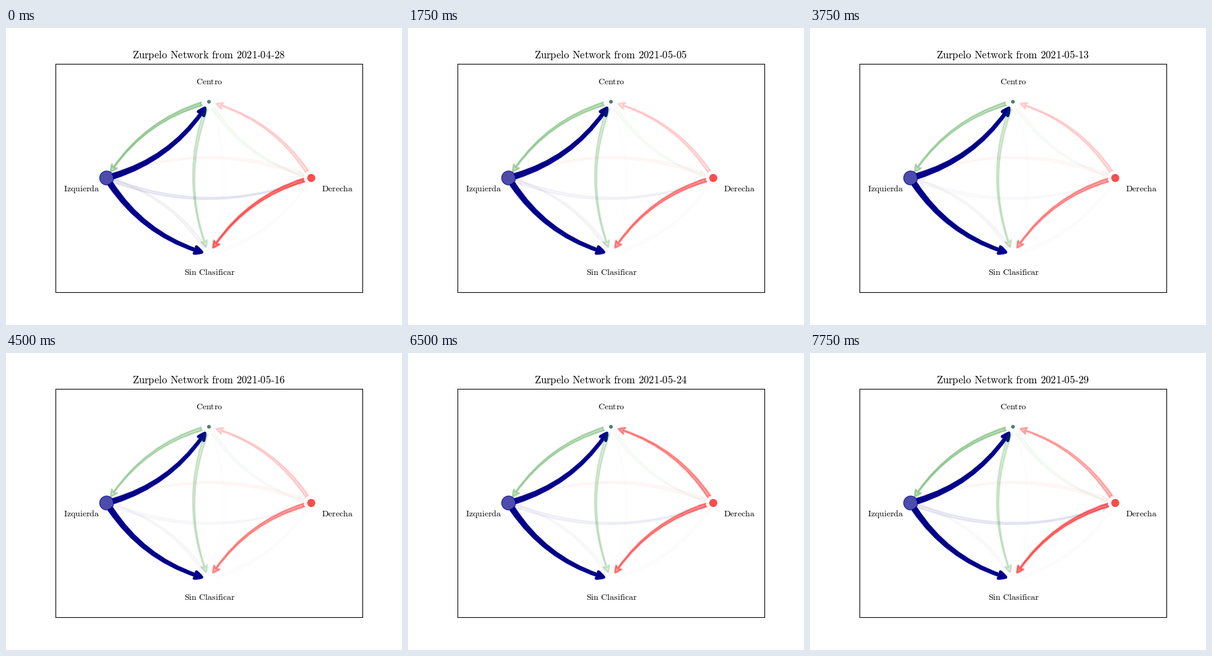
A matplotlib script that plays this animation: 640 px wide and 480 px high, repeating every 8000 ms.

```python
import numpy as np
import matplotlib.pyplot as plt
from matplotlib.animation import FuncAnimation
from matplotlib.patches import FancyArrowPatch, Rectangle

plt.rcParams["mathtext.fontset"] = "cm"

W, H, DPI = 640, 480, 100
DAYS = 32
EM = 12 * DPI / 72          # title size in pixels
GAP = r"\hspace{0.38}"      # one third of an em
TITLE_LEFT, TITLE_RIGHT, TITLE_Y = 204.1, 450.9, 430.7

NODES = {"I": (-1, 0), "C": (0, 1), "D": (1, 0), "S": (0, -1)}
COLORS = {"I": "darkblue", "C": "green", "D": "red", "S": "#6e5078"}
LABELS = [
    (-1.25, -0.15, "Izquierda"),
    (0, 1.25, "Centro"),
    (1.25, -0.15, "Derecha"),
    (0, -1.25, "Sin Clasificar"),
]


def roman(words):
    return r"$\mathrm{" + words.replace(" ", GAP) + "}$"


def day_title(day):
    month, date = (4, 28 + day) if day < 3 else (5, day - 2)
    return roman(f"Zurpelo Network from 2021 {month:02d} {date:02d}")


def bump(day, center, width):
    return np.exp(-((day - center) / width) ** 2 / 2)


def weights(day):
    """Strength of each edge, named by its start and end node."""
    t = day / (DAYS - 1)
    mid = np.sin(np.pi * t)
    lull = bump(day, 22, 2)
    return {
        "IC": 1 - 0.3 * lull,
        "ID": 0.065 - 0.048 * mid,
        "IS": 1,
        "CI": 0.28 - 0.04 * mid - 0.1 * lull,
        "CD": 0.03 - 0.012 * mid,
        "CS": 0.15,
        "DI": 0.025 - 0.015 * lull,
        "DC": 0.13 + 0.23 * bump(day, 27, 3.5),
        "DS": 0.47 - 0.13 * mid,
        "SI": 0.05 - 0.03 * t,
        "SC": 0.004,
        "SD": 0.006,
    }


fig = plt.figure(figsize=(W / DPI, H / DPI), dpi=DPI, facecolor="white")
ax = fig.add_axes([0.125, 0.11, 0.775, 0.77])
ax.set(xlim=(-1.5, 1.5), ylim=(-1.5, 1.5), xticks=[], yticks=[])

title = fig.text(TITLE_LEFT / W, TITLE_Y / H, day_title(0), fontsize=12,
                 ha="left", va="baseline")

# Short hyphens of the date sit in the gaps of the title.
for back in (2.656, 1.322):
    fig.add_artist(Rectangle(
        ((TITLE_RIGHT - back * EM) / W, (TITLE_Y + 0.187 * EM) / H),
        0.265 * EM / W, 0.06 * EM / H, color="black", lw=0))

for x, y, name in LABELS:
    ax.text(x + 0.005, y - 0.025, roman(name), fontsize=10,
            ha="center", va="baseline", zorder=3)

# One collection, so the discs keep their exact subpixel centers.
ax.scatter(*zip(*(NODES[key] for key in "ICD")), s=[265, 11, 88],
           c=["darkblue", "#1a5a3c", "red"], alpha=0.7,
           linewidths=[1, 1, 0], zorder=2)

arrows = {}
for pair in weights(0):
    start, end = pair
    arrows[pair] = ax.add_patch(FancyArrowPatch(
        NODES[start], NODES[end],
        arrowstyle="fancy,head_length=0.4,head_width=0.4,tail_width=0.2",
        connectionstyle="arc3,rad=0.2", mutation_scale=20,
        shrinkA=8.66, shrinkB=8.66, color=COLORS[start], zorder=1))


def update(day):
    title.set_text(day_title(day))
    for pair, weight in weights(day).items():
        arrows[pair].set_alpha(weight)
        arrows[pair].set_linewidth(1.7 + 1.8 * weight ** 3)
    return [title, *arrows.values()]


anim = FuncAnimation(fig, update, frames=DAYS, interval=250,
                     repeat=True, repeat_delay=0, blit=False)
plt.show()
```
